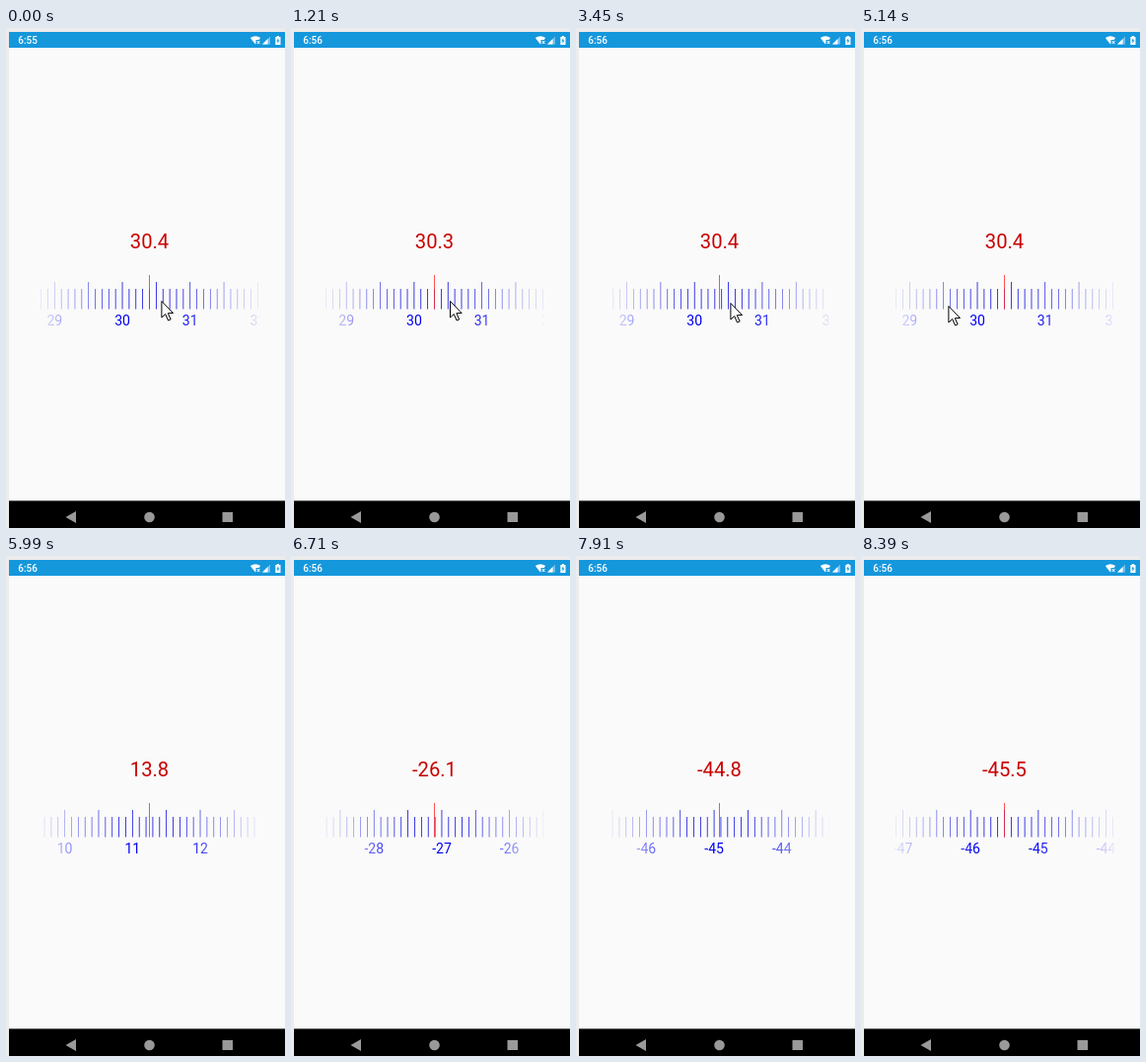
Write an HTML page with a canvas that moves like this. It is 283 px wide and 506 px high and loops after 9510 ms.

```html
<!DOCTYPE html>
<html lang="en">
<head>
<meta charset="utf-8">
<title>Ruler wheel</title>
<style>
html, body { margin: 0; width: 100%; height: 100%; overflow: hidden; background: #fafafa; }
canvas { display: block; }
</style>
</head>
<body>
<canvas id="stage" width="283" height="506"></canvas>
<script>
const ctx = document.getElementById('stage').getContext('2d');
const LOOP = 9510, STEP = 120;
const MID = 145.5, UNIT = 68.7, REACH = 111;
const BAR = '#1597dc';
const FLING_START = 5779, FLING_TIME = 2463, FLING_SHOWN = 5870, SNAP = 8390, TEXT_LAG = 31.5;
const THROW = 28.9, REST = -45.5;

const clamp = u => Math.min(1, Math.max(0, u));
// Stepped progress from 0 to 1, the first step being visible at start
const ramp = (t, start, steps) => clamp((Math.floor((t - start) / STEP) + 1) / steps);

// Fling easing: time and distance are cubics of one parameter, found by bisection
const curve = (x, a, b) => 3 * x * (1 - x) * ((1 - x) * a + x * b) + x ** 3;
function flingEase(u) {
  let lo = 0, hi = 1;
  for (let i = 0; i < 24; i++) {
    const x = (lo + hi) / 2;
    if (curve(x, 0.175, 0.35) < u) lo = x; else hi = x;
  }
  return curve(lo, 0.5, 1);
}
const flingValue = t => THROW + (REST - THROW) * flingEase(clamp((t - FLING_START) / FLING_TIME));

function stateAt(t) {
  if (t >= SNAP) return { value: REST, shown: REST };
  if (t >= FLING_SHOWN) {
    const s = FLING_SHOWN + Math.floor((t - FLING_SHOWN) / STEP) * STEP;
    return { value: flingValue(s), shown: flingValue(s - TEXT_LAG) };
  }
  // Two small drags, each released to settle on the next tenth, then a long pull
  const drag = 0.052, settle = 0.1 - drag;
  const right = ramp(t, 120, 4), left = ramp(t, 2710, 3), pull = ramp(t, 5510, 3);
  const hover = 1 - (1 - ramp(t, 3940, 11)) ** 2;
  const value = 30.4 + drag * (left - right) + settle * (ramp(t, 3450, 3) - ramp(t, 970, 3))
    - (30.4 - THROW) * pull;
  const x = 157.4 + drag * UNIT * (right - left) - left - 68 * hover + (30.4 - THROW) * UNIT * pull;
  const y = 276 + 2 * left + 3 * hover + 3 * pull;
  return { value, shown: value, pointer: [x, y] };
}

function rect(color, x, y, w, h) {
  ctx.fillStyle = color;
  ctx.fillRect(x, y, w, h);
}

function shape(color, path, stroke) {
  const p = new Path2D(path);
  ctx.fillStyle = color;
  ctx.fill(p);
  if (stroke) {
    ctx.strokeStyle = stroke;
    ctx.stroke(p);
  }
}

function text(str, x, y, font, color, align = 'center') {
  ctx.font = font + ' Roboto, sans-serif';
  ctx.textAlign = align;
  ctx.fillStyle = color;
  ctx.fillText(str, x, y);
}

function fade(rgb) {
  const g = ctx.createLinearGradient(MID - REACH, 0, MID + REACH, 0);
  for (const side of [-1, 1]) {
    g.addColorStop(0.5 + side * 0.5, `rgba(${rgb},.08)`);
    g.addColorStop(0.5 + side * 0.13, `rgba(${rgb},1)`);
  }
  return g;
}
const tickFade = fade('0,0,225'), labelFade = fade('0,0,245');

function drawScreen(clock) {
  rect('#ececec', 0, 0, 283, 506);
  rect('#fafafa', 3, 20, 280, 458);
  rect(BAR, 3, 4, 280, 16);
  text(clock, 12.2, 16, '500 10px', '#fff', 'left');

  // Wi-Fi, signal, battery
  shape('#fff', 'M253 16.5 L247.8 10 Q253 6.4 258.2 10 Z');
  rect(BAR, 253.5, 12, 5, 5);
  text('×', 256, 16.8, '700 7px', '#fff');
  shape('rgba(255,255,255,.4)', 'M260 16.5 h8 v-8 Z');
  shape('#fff', 'M260 16.5 h5.5 v-5.5 Z');
  rect('#fff', 273.3, 9, 5.2, 8);
  rect('#fff', 274.8, 8, 2.2, 1);
  shape(BAR, 'M276.3 10 l-2 3.3 h1.3 l-.3 2.7 l2.2 -3.6 h-1.3 Z');

  // Navigation bar
  rect('#000', 3, 478, 280, 28);
  rect('#6b716e', 3, 478, 280, 1);
  shape('#999', 'M60.5 495 l10.5 -6 v12 Z');
  shape('#999', 'M140.2 495 a5.3 5.3 0 0 1 10.6 0 a5.3 5.3 0 0 1 -10.6 0');
  rect('#999', 219.5, 490, 10.5, 10);
}

function drawWheel(value) {
  ctx.save();
  ctx.beginPath();
  ctx.rect(MID - REACH, 240, REACH * 2, 70);
  ctx.clip();
  const first = Math.floor(value * 10) - 20;
  for (let n = first; n < first + 42; n++) {
    const x = MID + (n / 10 - value) * UNIT;
    const top = n % 5 ? 264 : 257;
    rect(tickFade, x - 0.38, top, 0.76, 284.5 - top);
    if (n % 10 === 0) text(String(n / 10), x, 301.3, '14px', labelFade);
  }
  ctx.restore();
  rect('rgba(255,40,40,.8)', MID - 0.5, 250, 1, 34.5);
}

function drawPointer([x, y]) {
  shape('#fff', `M${x + 0.5} ${y + 0.5} v16.5 l3.8 -3.5 l2.8 6.5 l2.6 -1.1 l-2.8 -6.2 l5.2 -.2 Z`, '#000');
}

function draw(t) {
  const { value, shown, pointer } = stateAt(t);
  drawScreen(t < 970 ? '6:55' : '6:56');
  text(shown.toFixed(1), MID, 222.6, '20.2px', '#c80000');
  drawWheel(value);
  if (pointer) drawPointer(pointer);
}

const began = performance.now();
function loop() {
  draw((performance.now() - began) % LOOP);
  requestAnimationFrame(loop);
}
loop();
</script>
</body>
</html>
```
